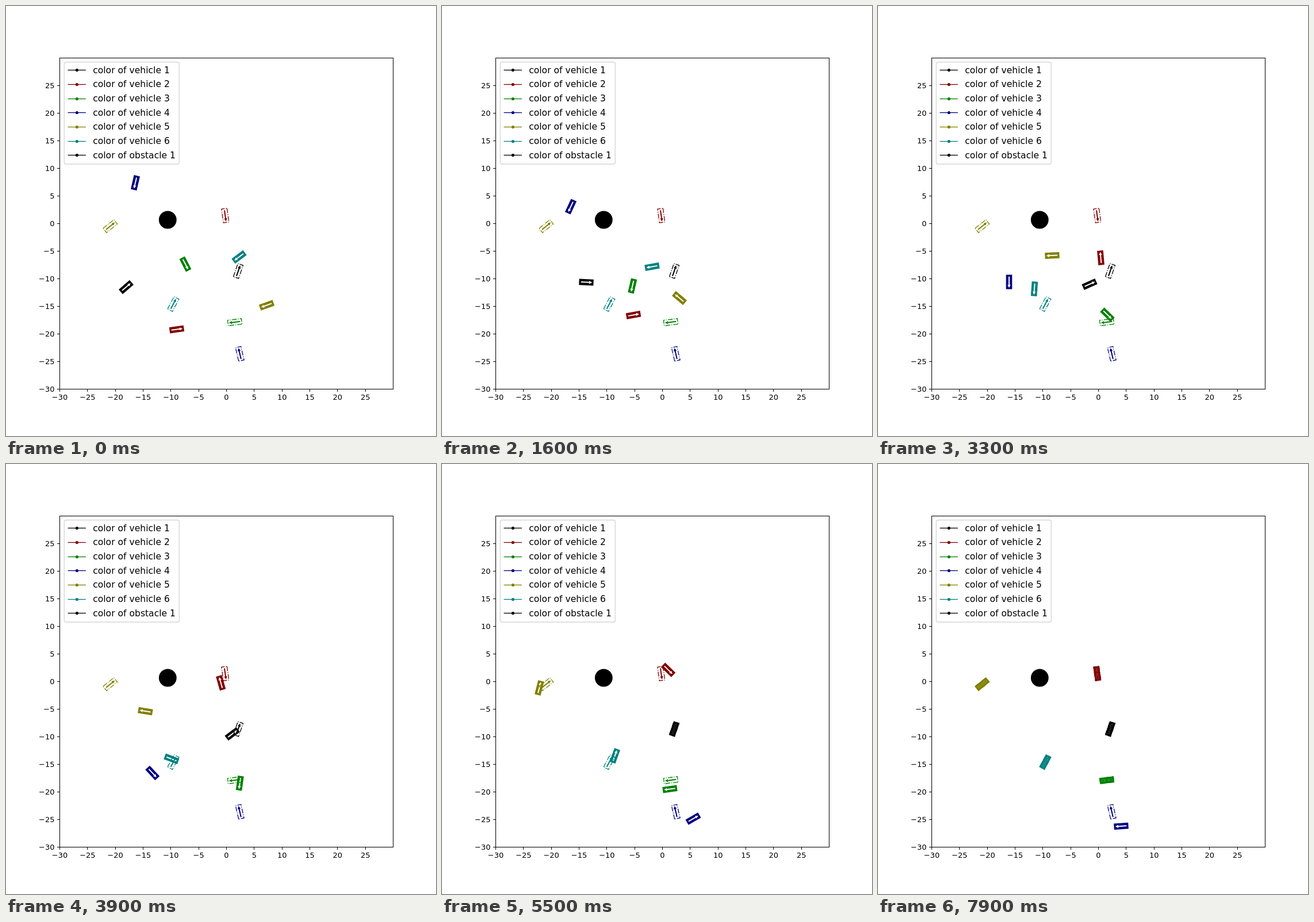
Write an HTML page with a canvas that moves like this. It is 748 px wide and 748 px high and loops after 8000 ms.

```html
<!DOCTYPE html>
<html lang="en">
<head>
<meta charset="utf-8">
<title>Vehicles driving to their goals</title>
<style>
  html, body { margin: 0; width: 100%; height: 100%; overflow: hidden; background: #fff; }
  canvas { display: block; width: 748px; height: 748px; }
</style>
</head>
<body>
<canvas id="stage" width="748" height="748"></canvas>
<script>
const ctx = document.getElementById('stage').getContext('2d');
const SIZE = 748, LOOP = 8000, STEP = 100;
const PT = 93.5 / 72, RAD = Math.PI / 180;
const BOX = { l: 93.5, r: 673.5, t: 90.5, b: 666.5 };
const LENGTH = 24.1, WIDTH = 9.6;

// Steps at which the cars pass their waypoints; the one after the last is the goal.
const BEATS = [0, 15, 24, 32, 45, 54, 64, 78, 92];

// A pose is [x, y, heading in degrees]; null leaves that beat to the curve.
function car(color, goal, ...poses) {
  const keys = [...poses, goal].map((p, i) => p && { s: BEATS[i], x: p[0], y: p[1], a: p[2], v: 0 });
  return { color, goal, path: withSpeeds(keys.filter(Boolean)) };
}

// A car passes a waypoint at the blended speed of the legs around it.
function withSpeeds(keys) {
  for (let i = 1; i < keys.length - 1; i++) {
    const [p, q, n] = keys.slice(i - 1, i + 2);
    const before = q.s - p.s, after = n.s - q.s;
    const v0 = Math.hypot(q.x - p.x, q.y - p.y) / before;
    const v1 = Math.hypot(n.x - q.x, n.y - q.y) / after;
    q.v = (v0 * after + v1 * before) / (before + after);
  }
  return keys;
}

const cars = [
  car('#000000', [404, 461, 71],
    [209, 489, 41], [251, 480.5, -3], [307, 499, 1], [368, 484, 24]),
  car('#800000', [381.3, 364.5, -82],
    [297, 562.5, 8], [333, 537.5, 10], [383.5, 514, 89], [387.5, 438, 95],
    [375.5, 345.5, -12], null, [390, 373, -75]),
  car('#008000', [398, 550, -173],
    [312, 449, -63], [331.3, 487, -103], [344, 537, -12], [399, 537, -44],
    [397.5, 566.5, -153], null, [399.7, 560, -194]),
  car('#000080', [406.7, 605, 103],
    [225, 307.5, -103], [224, 349, -115], [231, 408, -58], [228, 480, -90],
    [328, 580, -12], [437, 617, 30], [468, 529.5, -12], [423, 630, -176]),
  car('#808000', [181.3, 383, 39],
    [453.5, 520.5, 200], [413, 508, 140], [367, 464.5, 139], [303, 434, 183],
    [182.3, 413, 153], null, [191, 373.5, 37]),
  car('#008080', [291, 518.5, 62],
    [405.5, 436.5, -143], [365.5, 453.5, -170], [309, 451.5, -192], [272, 492, -94],
    [309, 510.5, 93], null, [293.5, 514.5, 48])
];

// Cubic curve from p to q with end slopes m and n: its value and its slope at u.
const curve = (p, m, q, n, u) =>
  (1 + 2 * u) * (1 - u) ** 2 * p + u * (1 - u) ** 2 * m + u * u * (3 - 2 * u) * q + u * u * (u - 1) * n;
const curveSlope = (p, m, q, n, u) =>
  6 * u * (1 - u) * (q - p) + (1 - u) * (1 - 3 * u) * m + u * (3 * u - 2) * n;

function poseAt(path, step) {
  const i = path.findIndex(k => k.s > step);
  if (i < 0) {
    const { x, y, a } = path[path.length - 1];
    return [x, y, a];
  }
  const p = path[i - 1], q = path[i], h = q.s - p.s, u = (step - p.s) / h;
  const alongX = f => f(p.x, p.v * h * Math.cos(p.a * RAD), q.x, q.v * h * Math.cos(q.a * RAD), u);
  const alongY = f => f(p.y, -p.v * h * Math.sin(p.a * RAD), q.y, -q.v * h * Math.sin(q.a * RAD), u);
  const dx = alongX(curveSlope) / h, dy = alongY(curveSlope) / h;
  const base = p.a + (q.a - p.a) * u;
  // A moving car points along its track, forwards or backwards.
  let off = Math.atan2(-dy, dx) / RAD - base;
  off -= 180 * Math.round(off / 180);
  const grip = Math.min(1, Math.max(0, (Math.hypot(dx, dy) - 1.5) / 2.5));
  const atKey = u === 0 ? 0 : grip;
  return [alongX(curve), alongY(curve), base + off * atKey];
}

function arrow(color) {
  ctx.fillStyle = color;
  ctx.fillRect(-9.3, -1, 15, 2);
  ctx.beginPath();
  ctx.moveTo(5, -2.7);
  ctx.lineTo(10.3, 0);
  ctx.lineTo(5, 2.7);
  ctx.fill();
}

function place([x, y, a], draw) {
  ctx.save();
  ctx.translate(x, y);
  ctx.rotate(-a * RAD);
  draw();
  ctx.restore();
}

function drawCar(color, pose) {
  place(pose, () => {
    ctx.fillStyle = color;
    ctx.fillRect(-LENGTH / 2 - 0.5, -WIDTH / 2 - 0.5, LENGTH + 1, WIDTH + 1);
    arrow('#fff');
  });
}

function drawGoal(color, pose) {
  place(pose, () => {
    ctx.strokeStyle = color;
    ctx.lineWidth = PT;
    ctx.setLineDash([6.4, 1.6, 1, 1.6].map(d => d * PT));
    // The dashes run from the rear right corner along the right side.
    ctx.strokeRect(-LENGTH / 2, WIDTH / 2, LENGTH, -WIDTH);
    arrow(color);
  });
}

function line(x1, y1, x2, y2) {
  ctx.beginPath();
  ctx.moveTo(x1, y1);
  ctx.lineTo(x2, y2);
  ctx.stroke();
}

function disc(x, y, r) {
  ctx.beginPath();
  ctx.arc(x, y, r, 0, 2 * Math.PI);
  ctx.fill();
}

const font = pt => `${pt * PT}px "DejaVu Sans", sans-serif`;
const snap = v => Math.floor(v) + 0.5;

function drawAxes() {
  ctx.strokeStyle = ctx.fillStyle = '#000';
  ctx.lineWidth = 0.8 * PT;
  ctx.strokeRect(BOX.l, BOX.t, BOX.r - BOX.l, BOX.b - BOX.t);
  ctx.font = font(10);
  for (let v = -30; v < 30; v += 5) {
    const f = (v + 30) / 60;
    const x = BOX.l + f * (BOX.r - BOX.l), y = BOX.b - f * (BOX.b - BOX.t);
    const label = String(v).replace('-', '\u2212');
    line(snap(x), BOX.b, snap(x), BOX.b + 4.5);
    line(BOX.l, snap(y), BOX.l - 4.5, snap(y));
    ctx.textAlign = 'center';
    ctx.fillText(label, x, 685);
    ctx.textAlign = 'right';
    ctx.fillText(label, 84.4, Math.floor(y + 4.8));
  }
}

function drawLegend() {
  ctx.fillStyle = 'rgba(255,255,255,0.8)';
  ctx.strokeStyle = 'rgba(204,204,204,0.8)';
  ctx.lineWidth = PT;
  ctx.beginPath();
  ctx.roundRect(101.3, 97.5, 200, 177.5, 3.1);
  ctx.fill();
  ctx.stroke();
  ctx.font = font(12);
  ctx.textAlign = 'left';
  const rows = cars.map((c, i) => [c.color, `vehicle ${i + 1}`]);
  rows.push(['#000000', 'obstacle 1']);
  rows.forEach(([color, name], i) => {
    const y = 111.8 + i * 24.65;
    ctx.strokeStyle = ctx.fillStyle = color;
    line(107.5, snap(y), 138.9, snap(y));
    disc(123.4, snap(y), 2.6);
    ctx.fillStyle = '#000';
    ctx.fillText('color of ' + name, 151.2, Math.floor(y + 5.5));
  });
}

function render(now) {
  const step = Math.max(0, Math.floor(now % LOOP / STEP) - 1);
  ctx.fillStyle = '#fff';
  ctx.fillRect(0, 0, SIZE, SIZE);
  for (const c of cars) drawCar(c.color, poseAt(c.path, step));
  for (const c of cars) drawGoal(c.color, c.goal);
  ctx.fillStyle = '#000';
  disc(281.3, 372, 15.4);
  drawAxes();
  drawLegend();
}

const start = performance.now();
function tick() {
  render(performance.now() - start);
  requestAnimationFrame(tick);
}
tick();
</script>
</body>
</html>
```
